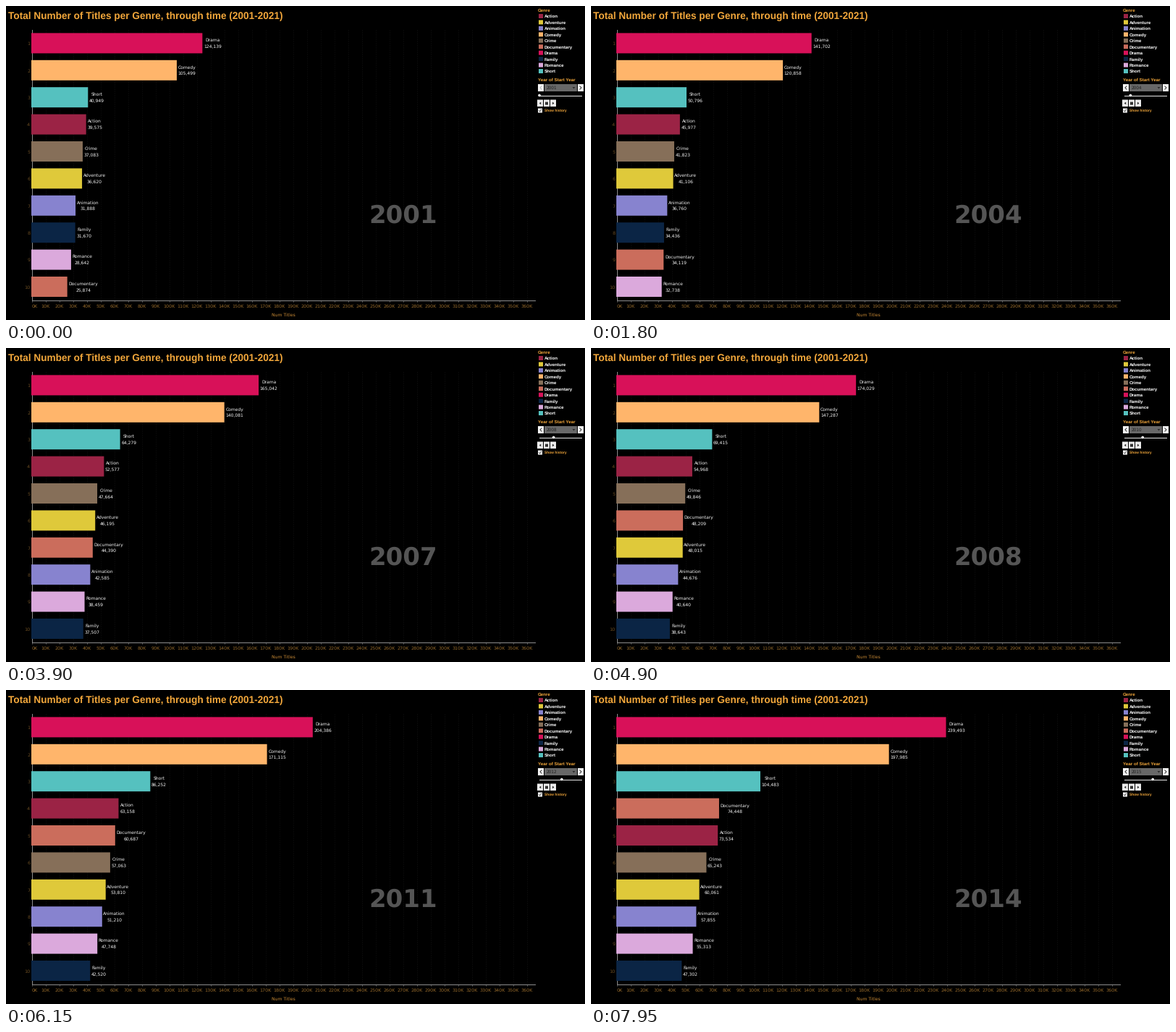
Write a matplotlib script that moves like this. It is 800 px wide and 434 px high and loops after 8 s.

```python
import numpy as np
import matplotlib.pyplot as plt
from matplotlib.animation import FuncAnimation
from matplotlib.patches import Circle, Polygon, Rectangle

W, H, DPI = 800, 434, 100
STEP_MS, FRAMES = 50, 160
ORANGE = "#f2a73b"
SANS, ARIAL = "DejaVu Sans", "Liberation Sans"
plt.rcParams["text.hinting"] = "none"

# Each genre: colour and its title counts in the key years.
FIRST_YEAR = 2001
KEY_YEARS = np.array([2001, 2004, 2008, 2014])
GENRES = {
    "Action": ("#9b2345", 39575, 45977, 54968, 73534),
    "Adventure": ("#dfc93a", 36620, 41106, 48015, 60061),
    "Animation": ("#8783cf", 31888, 36760, 44676, 57855),
    "Comedy": ("#ffb56b", 105499, 120858, 147287, 197985),
    "Crime": ("#866f59", 37083, 41823, 49846, 65243),
    "Documentary": ("#cb6d5c", 25874, 34119, 48209, 74448),
    "Drama": ("#d81159", 124139, 141702, 174029, 239493),
    "Family": ("#0b2545", 31670, 34436, 38643, 47302),
    "Romance": ("#dba9dc", 28642, 32738, 40640, 55313),
    "Short": ("#55c1bf", 40949, 50796, 69415, 104483),
}

# Steps at which the chart moves on a year; the control takes the other
# half of the same pair of steps, after one early change of its own.
CHART_CUES = [12, 26, 36, 51, 62, 75, 85, 99, 108, 121, 134, 145, 157]
PICK_CUES = [2] + [cue ^ 1 for cue in CHART_CUES]

X0, PER_K = 35.5, 1.9
BAR_X = 35
ROW0, ROW_STEP, BAR_H = 51.4, 37.4, 28

# Growth of each genre is a cubic through its key years.
CURVES = {name: np.polyfit(KEY_YEARS - FIRST_YEAR, counts, 3)
          for name, (_, *counts) in GENRES.items()}


def ranking(year):
    totals = [(name, round(float(np.polyval(curve, year - FIRST_YEAR))))
              for name, curve in CURVES.items()]
    return sorted(totals, key=lambda item: -item[1])


fig = plt.figure(figsize=(W / DPI, H / DPI), dpi=DPI, facecolor="black")
ax = fig.add_axes([0, 0, 1, 1])
ax.set_xlim(0, W)
ax.set_ylim(H, 0)
ax.axis("off")


def text(x, y, s, size, color, font=SANS, ha="left", **kw):
    """Text whose last line of capitals is centred on y; size in pixels."""
    return ax.text(x, y + 0.36 * size, s, fontsize=size * 72 / DPI, color=color,
                   family=font, ha=ha, va="baseline", **kw)


def rect(x0, y0, x1, y1, color):
    return ax.add_patch(Rectangle((x0, y0), x1 - x0, y1 - y0, fc=color, lw=0,
                                  snap=False, zorder=2))


def line(xs, ys, color, width=1, **kw):
    return ax.plot(xs, ys, color=color, lw=width * 72 / DPI, **kw)[0]


def shape(points, color):
    ax.add_patch(Polygon(points, fc=color, lw=0, zorder=3))


def draw_axes():
    for k in range(0, 361, 10):
        x = X0 + k * PER_K
        if k:
            line([x, x], [33, 406], "#131313", 1, dashes=(1, 2), zorder=0)
        line([x, x], [407, 409], "#6e6e6e", 0.7)
        text(x if k else 35.8, 414.3, f"{k}K", 6.4, "#93682a",
             ha="center" if k else "left")
    line([X0, X0], [33, 406.5], "#8c8c8c", 1, zorder=1)
    line([X0, 731], [406.5, 406.5], "#8c8c8c", 1, zorder=3)
    text(383, 427, "Num Titles", 6.1, "#c98a35", ha="center")
    for i in range(10):
        text(33.3, ROW0 + i * ROW_STEP + 0.4, str(i + 1), 6.5, "#674a20", ha="right")


def draw_legend():
    text(735, 5.6, "Genre", 6.2, ORANGE, ARIAL, weight="bold")
    for i, (name, (color, *_)) in enumerate(GENRES.items()):
        y = 14 + 8.45 * i
        rect(736, y - 3, 742, y + 3, color)
        text(743.8, y, name, 6.15, "white", ARIAL, weight="bold")


def draw_controls():
    text(735, 101.7, "Year of Start Year", 6.3, ORANGE, ARIAL, weight="bold")
    rect(735, 108, 743, 118, "#f4f4f4")
    rect(744, 108, 789, 118, "#686868")
    rect(790, 108, 798, 118, "#f4f4f4")
    line([792.9, 795, 792.9], [110.9, 113, 115.1], "#222222", 0.9, zorder=3)
    shape([(782.5, 112), (786.5, 112), (784.5, 114.4)], "#2a2a2a")
    line([737, 795], [123.5, 123.5], "#e8e8e8", 1)
    for i in range(21):
        x = 737 + 2.88 * i
        line([x, x], [125.7, 126.4], "#777777", 0.7)
    for x in (734, 743, 752):
        rect(x, 129.5, x + 8, 139, "#ededed")
    shape([(739.2, 132.6), (739.2, 136.2), (736.8, 134.4)], "#222222")
    rect(745, 132.6, 749, 136.6, "#333333")
    shape([(755, 132.6), (755, 136.2), (757.4, 134.4)], "#222222")
    rect(735, 141.5, 741, 147.5, "#f4f4f4")
    line([736.4, 737.6, 739.7], [144.6, 145.9, 142.9], "#444444", 0.8, zorder=3)
    text(743.8, 144.6, "Show history", 4.9, ORANGE, ARIAL, weight="bold")


text(3, 13.2, "Total Number of Titles per Genre, through time (2001-2021)",
     13.65, ORANGE, ARIAL, weight="bold")
draw_axes()
draw_legend()
draw_controls()

year_text = text(549, 287.3, "", 34, "#555555", ha="center", weight="bold")
pick_text = text(747, 113, "", 5.8, "#222222")
back_arrow = line([740, 737.9, 740], [110.9, 113, 115.1], "#222222", 0.9, zorder=3)
knob = ax.add_patch(Circle((737, 123.5), 1.8, fc="white", lw=0, zorder=4))
bars, labels = [], []
for row in range(10):
    mid = ROW0 + row * ROW_STEP
    bars.append(rect(BAR_X, mid - BAR_H / 2, X0, mid + BAR_H / 2, "white"))
    labels.append(text(0, mid + 4.8, "", 6, "#f2f2f2",
                       multialignment="center", linespacing=1.73))


def update(frame):
    year = FIRST_YEAR + sum(frame >= cue for cue in CHART_CUES)
    pick = FIRST_YEAR + sum(frame >= cue for cue in PICK_CUES)
    year_text.set_text(str(year))
    pick_text.set_text(str(pick))
    back_arrow.set_color("#b0b0b0" if pick == FIRST_YEAR else "#222222")
    knob.center = (737 + 2.8 * (pick - FIRST_YEAR), 123.5)
    for bar, label, (name, total) in zip(bars, labels, ranking(year)):
        end = X0 + total / 1000 * PER_K
        bar.set_width(end - BAR_X)
        bar.set_facecolor(GENRES[name][0])
        label.set_x(end + 1.6)
        label.set_text(f"{name}\n{total:,}")
    return [year_text, pick_text, back_arrow, knob, *bars, *labels]


anim = FuncAnimation(fig, update, frames=FRAMES, interval=STEP_MS,
                     repeat=True, repeat_delay=0, blit=False)
plt.show()
```
